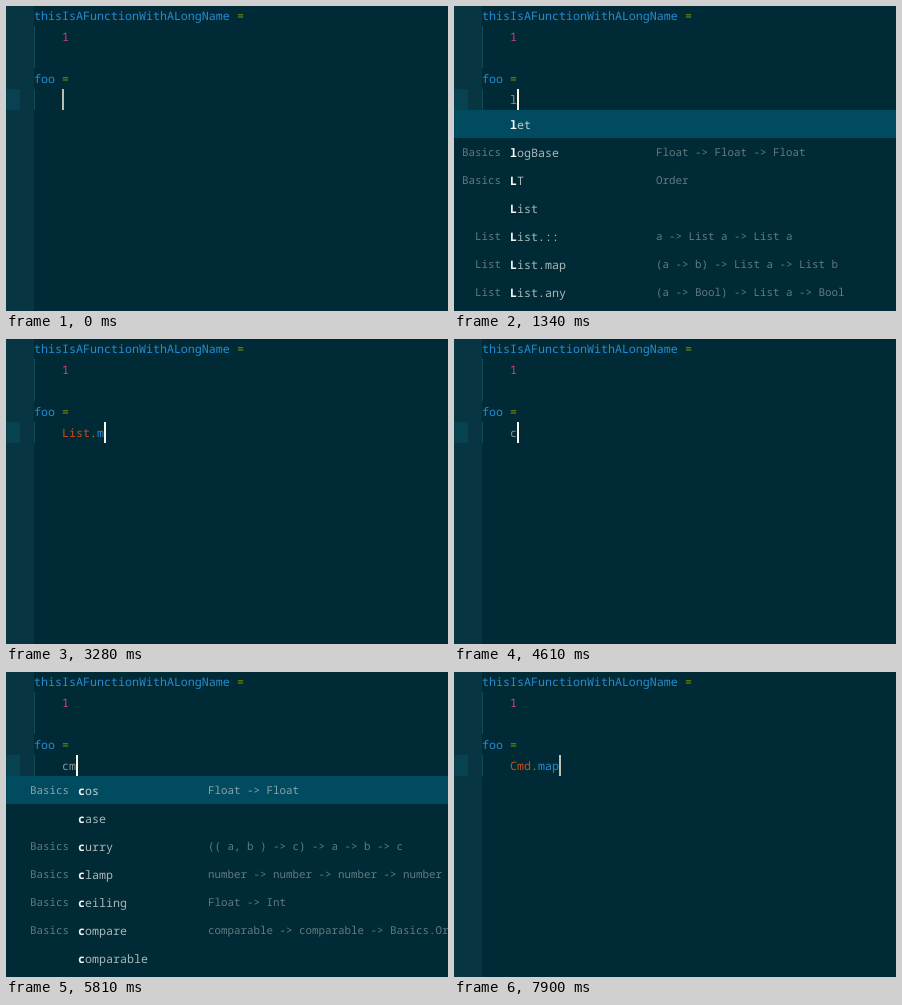
Recreate the animation shown at these times as an HTML page with a canvas. Size 442 by 305 pixels, loop 8 s.

```html
<!DOCTYPE html>
<html lang="en">
<head>
<meta charset="utf-8">
<title>Autocomplete in a code editor</title>
<style>
  html, body { margin: 0; width: 442px; height: 305px; overflow: hidden; background: #002b36; }
  canvas { display: block; }
</style>
</head>
<body>
<canvas id="stage" width="442" height="305"></canvas>
<script>
const ctx = document.getElementById('stage').getContext('2d');
const LOOP = 8000, CHAR = 7, LEFT = 28, INDENT = 56, ROW = 28;
const FACE = '"Noto Sans Mono", "DejaVu Sans Mono", monospace';
const CODE = `500 11.667px ${FACE}`, BOLD = `bold 11.667px ${FACE}`, SMALL = `500 10.833px ${FACE}`;
const BLUE = '#268bd2', GREEN = '#859900', PINK = '#e0378a', ORANGE = '#cb4b16', GREY = '#839496';

// Rows are [module, word, type]; an asterisk marks the next letter as matched.
const menus = {
  l: { word: 56, type: 202, rows: [
    ['', '*let', ''],
    ['Basics', '*logBase', 'Float -> Float -> Float'],
    ['Basics', '*LT', 'Order'],
    ['', '*List', ''],
    ['List', '*List.::', 'a -> List a -> List a'],
    ['List', '*List.map', '(a -> b) -> List a -> List b'],
    ['List', '*List.any', '(a -> Bool) -> List a -> Bool']] },
  lm: { word: 56, type: 266, rows: [
    ['List', '*List.*map', '(a -> b) -> List a -> List b'],
    ['List', '*List.*map2', '(a -> b -> result) -> List a -> List b'],
    ['List', '*List.*map5', '(a -> b -> c -> d -> e -> result)'],
    ['List', '*List.*map4', '(a -> b -> c -> d -> result)'],
    ['List', '*List.*map3', '(a -> b -> c -> result) -> List a'],
    ['List', '*List.*member', 'a -> List a -> Bool'],
    ['List', '*List.*minimum', 'List comparable -> Maybe.Maybe comparable']] },
  c: { word: 72, type: 202, rows: [
    ['Basics', '*cos', 'Float -> Float'],
    ['', '*case', ''],
    ['Basics', '*curry', '(( a, b ) -> c) -> a -> b -> c'],
    ['Basics', '*clamp', 'number -> number -> number -> number'],
    ['Basics', '*ceiling', 'Float -> Int'],
    ['Basics', '*compare', 'comparable -> comparable -> Basics.Order'],
    ['', '*comparable', '']] },
  cm: { word: 56, type: 262, rows: [
    ['Platform.Cmd', '*Cmd.*map', '(a -> msg) -> Platform.Cmd.Cmd a'],
    ['', '*C*md', ''],
    ['Platform.Cmd', '*C*md.!', 'model -> List (Platform.Cmd.Cmd msg)'],
    ['Platform.Cmd', '*C*md.Cmd', 'Cmd'],
    ['Platform.Cmd', '*C*md.none', 'Platform.Cmd.Cmd msg'],
    ['Platform.Cmd', '*C*md.batch', 'List (Platform.Cmd.Cmd msg) -> Platform'],
    ['List', 'List.*concat*Map', '(a -> List b) -> List a -> List b']] }
};

// [time, text on the line, open menu, time the cursor blink restarted]
const events = [
  [0, '', null, -885],
  [1190, 'l', null, 1190],
  [1340, 'l', 'l', 1190],
  [1780, 'lm', 'lm', 1780],
  [2980, 'List.map', null, 2980],
  [3280, 'List.m', null, 3280],
  [3430, 'List', null, 3430],
  [3570, 'Li', null, 3570],
  [3720, '', null, 3570],
  [4610, 'c', null, 4610],
  [4760, 'c', 'c', 4610],
  [5810, 'cm', 'c', 5810],
  [5960, 'cm', 'cm', 5900],
  [7010, 'Cmd.map', null, 7010]
];

// The screen refreshes every 150 ms, with a slightly early beat at these times.
const beats = [140, 1630, 3570, 4610, 7450];
function refreshTime(t) {
  const start = beats.filter(b => b <= t).pop();
  return start === undefined ? 0 : start + 150 * Math.floor((t - start) / 150);
}

function rect(x, y, w, h, color) {
  ctx.fillStyle = color;
  ctx.fillRect(x, y, w, h);
}

function text(str, x, y, color, font = CODE, align = 'left') {
  ctx.font = font;
  ctx.textAlign = align;
  ctx.fillStyle = color;
  ctx.fillText(str, x, y);
}

function blink(age) {
  const u = age > 1000 ? age - 900 : age;
  if (u < 350 || u > 960) return 1;
  return u < 650 ? Math.max(0, (600 - u) / 250) : Math.max(0, (u - 690) / 270);
}

function drawEditor(line, age) {
  rect(0, 0, 442, 305, '#002b36');
  rect(0, 0, LEFT, 305, '#073642');
  rect(0, 83, 14, 21, '#08414f');
  rect(LEFT, 20, 1, 42, '#124b58');
  rect(LEFT, 83, 1, 21, '#124b58');
  text('thisIsAFunctionWithALongName', LEFT, 14, BLUE);
  text('=', LEFT + 29 * CHAR, 14, GREEN);
  text('1', INDENT, 35, PINK);
  text('foo', LEFT, 77, BLUE);
  text('=', LEFT + 4 * CHAR, 77, GREEN);

  const qualified = /^[A-Z]/.test(line);
  let x = INDENT;
  line.split(/(\.)/).forEach((part, i) => {
    text(part, x, 98, qualified ? [ORANGE, GREEN, BLUE][i] : GREY);
    x += part.length * CHAR;
  });
  ctx.globalAlpha = blink(age);
  rect(x, 83, 2, 21, '#fdf6e3');
  ctx.globalAlpha = 1;
}

function drawMenu({ word, type, rows }) {
  rect(0, 104, 442, 201, '#002b36');
  rect(0, 104, 442, ROW, '#004b5f');
  rows.forEach(([module, name, signature], i) => {
    const y = 122 + i * ROW;
    const dim = i ? '#627a81' : '#8aa5aa';
    text(module, word - 9, y, dim, SMALL, 'right');
    text(signature, type, y, dim, SMALL);
    let x = word;
    for (const [, mark, char] of name.matchAll(/(\*?)(.)/g)) {
      text(char, x, y + 1, mark ? '#f8faf9' : i ? '#a9b7b8' : '#c3d1d2', mark ? BOLD : CODE);
      x += CHAR;
    }
  });
}

function draw(now) {
  const t = refreshTime(now % LOOP);
  const [, line, menu, restarted] = events.filter(e => e[0] <= t).pop();
  ctx.textRendering = 'geometricPrecision';
  drawEditor(line, t - restarted);
  if (menu) drawMenu(menus[menu]);
}

const begin = performance.now();
function tick() {
  draw(performance.now() - begin);
  requestAnimationFrame(tick);
}
tick();
</script>
</body>
</html>
```
